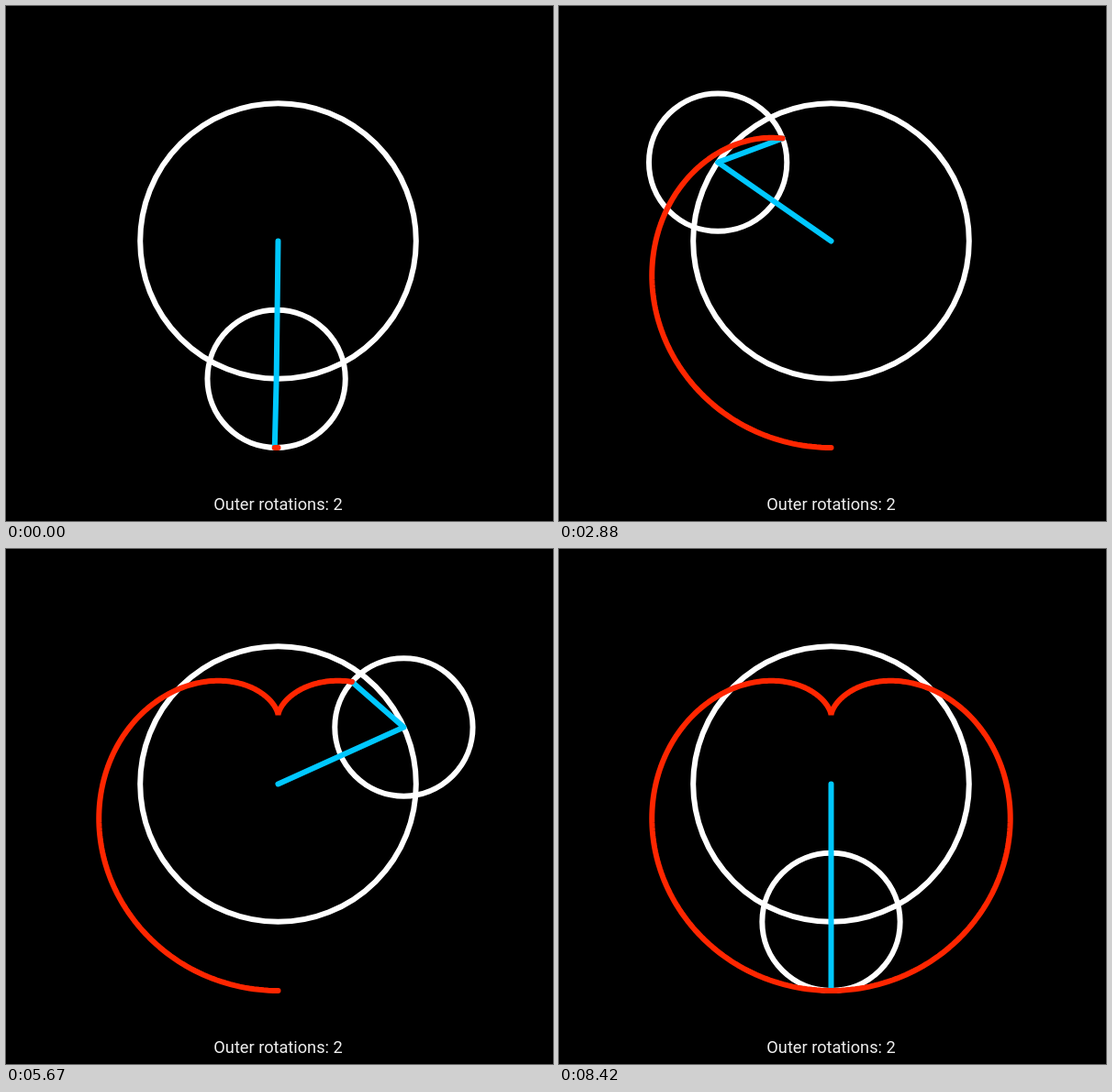
Write an HTML page with a canvas that moves like this. It is 596 px wide and 562 px high and loops after 9970 ms.

```html
<!DOCTYPE html>
<html lang="en">
<head>
<meta charset="utf-8">
<title>Rolling circle</title>
<style>
  html, body { margin: 0; width: 100%; height: 100%; overflow: hidden; background: #000; }
  canvas { display: block; }
</style>
</head>
<body>
<canvas id="stage" width="596" height="562"></canvas>
<script>
const ctx = document.getElementById('stage').getContext('2d');
const LOOP = 9970;
const CENTER = { x: 296.5, y: 256.5 };
const ARM = 150.3;
const RADIUS = ARM / 2;
const TURNS = 2;

// [time in ms, arm angle in degrees], clockwise from straight down
const PACE = [
  [0, 0.67], [970, 42.4], [2210, 96], [3550, 153.6],
  [4820, 209.4], [6520, 281.8], [8370, 360]
];

function armAngle(time) {
  const next = PACE.findIndex(([t]) => t > time);
  if (next < 0) return 2 * Math.PI;
  const [t0, a0] = PACE[next - 1];
  const [t1, a1] = PACE[next];
  return (a0 + (a1 - a0) * (time - t0) / (t1 - t0)) * Math.PI / 180;
}

const polar = (from, radius, angle) => ({
  x: from.x - radius * Math.sin(angle),
  y: from.y + radius * Math.cos(angle)
});
const hub = angle => polar(CENTER, ARM, angle);
const pen = angle => polar(hub(angle), RADIUS, TURNS * angle);

function circle(center, radius) {
  ctx.beginPath();
  ctx.arc(center.x, center.y, radius, 0, 2 * Math.PI);
  ctx.strokeStyle = '#fff';
  ctx.stroke();
}

function polyline(points, color, join) {
  ctx.beginPath();
  for (const p of points) ctx.lineTo(p.x, p.y);
  ctx.strokeStyle = color;
  ctx.lineJoin = join;
  ctx.stroke();
}

function trail(angle) {
  const step = Math.PI / 180;
  const points = [];
  for (let a = 0; a < angle; a += step) points.push(pen(a));
  points.push(pen(angle));
  return points;
}

function draw(time) {
  const angle = armAngle(time);
  ctx.fillStyle = '#000';
  ctx.fillRect(0, 0, 596, 562);
  ctx.lineWidth = 6;
  ctx.lineCap = 'round';

  circle(CENTER, ARM);
  circle(hub(angle), RADIUS);
  polyline([CENTER, hub(angle), pen(angle)], '#00c8ff', 'round');
  polyline(trail(angle), '#ff2600', 'bevel');

  ctx.font = '18.2px Roboto, sans-serif';
  ctx.textAlign = 'center';
  ctx.fillStyle = '#eee';
  ctx.fillText('Outer rotations: ' + TURNS, CENTER.x, 549.5);
}

const start = performance.now();
function tick() {
  draw((performance.now() - start) % LOOP);
  requestAnimationFrame(tick);
}
tick();
</script>
</body>
</html>
```
